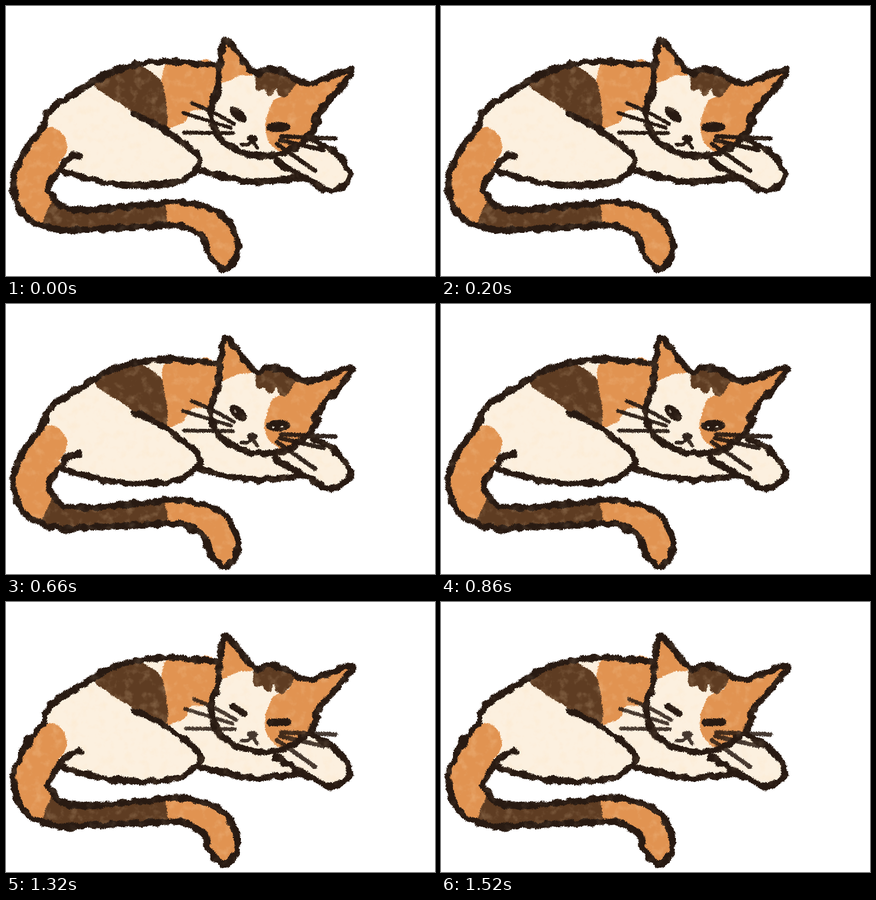
Recreate the animation shown at these times as an HTML page. Size 787 by 495 pixels, loop 1.65 s.

```html
<!DOCTYPE html>
<html lang="en">
<head>
<meta charset="utf-8">
<title>Dozing calico cat</title>
<style>
html, body { margin: 0; width: 100%; height: 100%; overflow: hidden; background: #fff; }
svg { display: block; width: 787px; height: 495px; }
</style>
</head>
<body>
<svg id="stage" viewBox="0 0 787 495" fill="none" stroke-linecap="round" stroke-linejoin="round"></svg>
<script>
const INK = '#281a12', ORANGE = '#e19351', BROWN = '#5e3c22', CREAM = '#fcf0df';
const STEP = 330;

// Smooth curve through "x,y x,y ..." points
function curve(text, closed = false, ease = 6) {
  const pts = text.trim().split(/\s+/).map(p => p.split(',').map(Number));
  const n = pts.length;
  const at = i => closed ? pts[(i + n) % n] : pts[Math.max(0, Math.min(n - 1, i))];
  let d = 'M' + pts[0];
  for (let i = 0; i < (closed ? n : n - 1); i++) {
    const [a, b, c, e] = [at(i - 1), at(i), at(i + 1), at(i + 2)];
    const lead = [0, 1].map(k => b[k] + (c[k] - a[k]) / ease);
    const trail = [0, 1].map(k => c[k] - (e[k] - b[k]) / ease);
    d += `C${lead} ${trail} ${c}`;
  }
  return d + (closed ? 'Z' : '');
}
const shape = (pts, color) => `<path d="${curve(pts, true, 8)}" fill="${color}"/>`;
const line = (pts, width, closed) =>
  `<path d="${curve(pts, closed)}" stroke="${INK}" stroke-width="${width}"/>`;
const oval = (x, y, rx, ry, turn = 0, color = INK) =>
  `<ellipse rx="${rx}" ry="${ry}" fill="${color}" transform="translate(${x} ${y}) rotate(${turn})"/>`;
const clip = (id, d) => `<clipPath id="${id}"><path d="${d}"/></clipPath>`;
const within = (id, parts) => `<g clip-path="url(#${id})">${parts}</g>`;
const slide = (x, parts) => `<g transform="translate(${x})">${parts}</g>`;

// Tail spine as [x, y, half width]; side is 1 for the inner edge, -1 for the outer
const spine = [[70, 277, 36], [46, 325, 33], [58, 364, 31], [100, 390, 21.5], [160, 391, 18],
  [250, 385, 20], [325, 382, 22], [379, 404, 27], [398, 441, 28.5], [402, 467, 18]];
const tailEdge = side => spine.map(([x, y, r], i) => {
  const [ax, ay] = spine[Math.max(0, i - 1)], [bx, by] = spine[Math.min(spine.length - 1, i + 1)];
  const reach = side * r / Math.hypot(bx - ax, by - ay);
  return [x + (by - ay) * reach, y - (bx - ax) * reach].join();
});
const tail = [...tailEdge(-1), '402,481', ...tailEdge(1).reverse()].join(' ');

const back = '390,109 345,105 285,102 205,116 130,158 82,189 66,225';
const belly = '104,304 200,326 300,326 345,304 352,275 285,223 235,198';
const arm = '358,303 450,322 548,314';
const paw = '548,315 597,338 631,313 605,270 562,245';
const body = `${back} 38,261 104,304 200,326 300,326 345,304 ${arm} ${paw}`;
const head = '455,121 407,64 396,84 388,152 376,190 390,240 440,270 500,272 548,246 571,215 570,200 635,119 555,142 510,121 480,116';

const clips = clip('body', curve(body, true)) + clip('head', curve(head, true)) +
  clip('tail', curve(tail, true)) + clip('band', 'M86 350L290 350L300 415L58 415Z');

const coat = shape(body, CREAM) + within('body',
    shape('304,95 400,95 380,183 340,192 325,215 285,228 296,195 285,140', ORANGE) +
    shape('168,152 165,125 215,95 252,112 285,138 296,192 290,227 233,194', BROWN) +
    oval(79, 257, 33, 35, 0, ORANGE)) +
  shape(tail, ORANGE) + within('band', shape(tail, BROWN)) +
  shape(head, CREAM) + within('head',
    shape('380,40 470,40 456,122 430,127 400,140 380,143', ORANGE) +
    shape('532,125 660,100 600,280 508,268 480,245 475,215 490,174 518,160', ORANGE));

const fringe = shape('464,105 535,125 515,166 500,163 496,151 489,164 479,163 474,153 459,152', BROWN);

const outline = line(`${back} ${tail} 118,278 135,275`, 12) + line(belly, 11.5) + line(arm, 12) +
  line(`494,284 ${paw}`, 12) + line(head, 12, true);

const leftWhiskers = ['341,178 380,195 418,216', '325,196 412,223', '327,232 416,233'].map(w => line(w, 7)).join('');
const rightWhiskers = ['505,239 604,243', '503,246 582,264', '497,253 567,302'].map(w => line(w, 8)).join('');
const mouth = oval(452, 243, 10, 6.5, 5) + line('432,254 443,254 452,249 461,260', 6.5);

const eyes = (open, dy = 0) => oval(426, 199 + dy, 19, open, 42) + oval(499, 222 + dy, 22.5, open, -2);
const glint = (x, y, turn) => oval(x, y, 3, 1.2, turn, CREAM);
const glints = glint(421, 197, 65) + glint(490, 226, 8) + glint(507, 225, -8);

const calm = { seed: 3, nudge: 0, soft: 1, eyes: eyes(9.5) };
const awake = { seed: 11, nudge: 4, soft: .86, eyes: eyes(11, 2) + glints + glint(432, 206, 50) };
const alert = { seed: 23, nudge: 0, soft: .95, eyes: eyes(10.5, 1) + glints };
const shut = { ...awake, eyes: line('416,191 437,205', 12) + line('485,221 516,220', 14) };
const poses = [calm, awake, alert, calm, shut];
const looks = [...new Set(poses)];

const noise = (freq, seed, octaves, name) =>
  `<feTurbulence type="fractalNoise" baseFrequency="${freq}" numOctaves="${octaves}" seed="${seed}" result="${name}"/>`;
const shift = (source, map, scale) =>
  `<feDisplacementMap in="${source}" in2="${map}" scale="${scale}" xChannelSelector="R" yChannelSelector="G" result="moved"/>`;

// Bumps, a crumbly edge, then pale crayon flecks
function crayon(id, seed, bumps, flecks) {
  return `<filter id="${id}" filterUnits="userSpaceOnUse" x="0" y="0" width="787" height="495" color-interpolation-filters="sRGB">
    ${noise(.07, seed, 1, 'wave')}${shift('SourceGraphic', 'wave', bumps)}
    ${noise(.45, seed + 1, 2, 'crumb')}${shift('moved', 'crumb', 5)}
    ${noise(.06, seed + 2, 5, 'dust')}
    <feColorMatrix in="dust" values="0 0 0 0 1  0 0 0 0 .88  0 0 0 0 .72  ${flecks} 0 0 0 ${-flecks * .5}"/>
    <feComposite in2="moved" operator="in" result="pale"/>
    <feMerge><feMergeNode in="moved"/><feMergeNode in="pale"/></feMerge>
  </filter>`;
}

function draw({ seed, nudge, soft, eyes }, i) {
  const layer = (name, parts) => `<g filter="url(#${name + i})">${parts}</g>`;
  return crayon('fill' + i, seed, 5, .6) + crayon('edge' + i, seed, 13, .35) + crayon('fine' + i, seed, 2, .35) +
    `<g class="look">
      ${layer('fill', coat + within('head', slide(-nudge, fringe)))}
      ${layer('edge', outline)}
      ${layer('fine', eyes + `<g opacity="${soft}">${slide(nudge, leftWhiskers)}${rightWhiskers}${mouth}</g>`)}
    </g>`;
}

document.getElementById('stage').innerHTML = clips + looks.map(draw).join('');
const layers = [...document.querySelectorAll('.look')];
const start = performance.now();
let shown = null;

function tick() {
  const time = Math.max(0, performance.now() - start);
  const look = poses[Math.floor(time / STEP) % poses.length];
  if (look !== shown) {
    layers.forEach((layer, i) => layer.style.display = looks[i] === look ? '' : 'none');
    shown = look;
  }
  requestAnimationFrame(tick);
}
tick();
</script>
</body>
</html>
```
